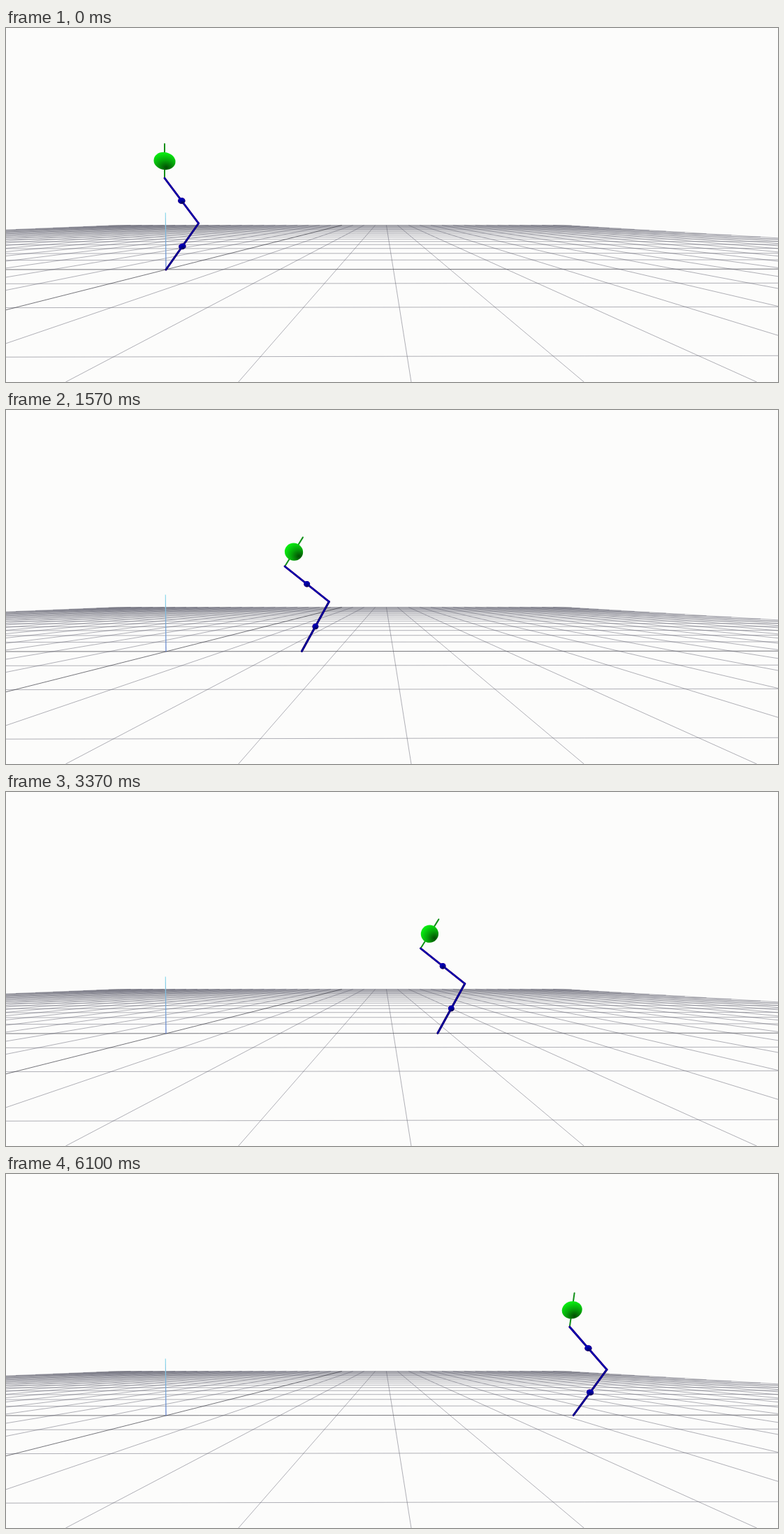
An HTML page with a canvas that plays this animation: 1105 px wide and 507 px high, repeating every 6130 ms.

```html
<!DOCTYPE html>
<html>
<head>
<meta charset="utf-8">
<title>Hopping robot</title>
<style>
html, body { margin: 0; width: 100%; height: 100%; overflow: hidden; background: #fcfcfb; }
canvas { display: block; }
</style>
</head>
<body>
<canvas id="stage" width="1105" height="507"></canvas>
<script>
const W = 1105, H = 507, LOOP = 6130;
const ctx = document.getElementById('stage').getContext('2d');
const VX = 542, VY = 267;          // vanishing point of the floor
const FOCAL = 440, BONE = 81, TORSO = 49;
const HOP_TIME = 1800, HOP_LENGTH = 194.4, START_X = 229;

// Poses of one hop: time, hip x, hip y, torso tilt, blue foot x, y, red foot x, y
const STAND = [0, -2, 215, 0, 0, 346, 0, 346];
const HOP = [
  [570, 0, 206, 59, 83, 345.5, 83, 345.5],
  [730, 42, 180, 47, 180, 269, 74, 279],
  [1050, 98, 112, 18, 204, 240, 150, 255],
  [1330, 150, 223, 60, 194, 345.5, 194, 345.5],
  [1440, 160, 230, 48, 194, 345.5, 194, 345.5],
  [1570, 170, 224, 32, 194.4, 345.5, 194.4, 345.5],
  [1900, 189, 219, 8, 194.4, 345.5, 194.4, 345.5]
];
const keys = [STAND];
for (let n = 0; n < 3; n++)
  for (const k of HOP)
    keys.push(k.map((v, i) =>
      i === 0 ? v + n * HOP_TIME : [1, 4, 6].includes(i) ? v + n * HOP_LENGTH : v));

const slope = (i, c) => (keys[i + 1][c] - keys[i][c]) / (keys[i + 1][0] - keys[i][0]);

function tangent(i, c) {
  if (i === 0 || i === keys.length - 1) return 0;
  const a = slope(i - 1, c), b = slope(i, c);
  return a * b > 0 ? 2 * a * b / (a + b) : 0;
}

function poseAt(t) {
  const last = keys.length - 1;
  if (t >= keys[last][0]) return keys[last];
  let i = 0;
  while (keys[i + 1][0] <= t) i++;
  const a = keys[i], b = keys[i + 1], d = b[0] - a[0], s = (t - a[0]) / d;
  const ease = s * s * (3 - 2 * s);
  return a.map((v, c) => v + (b[c] - v) * ease
    + d * s * (1 - s) * ((1 - s) * tangent(i, c) - s * tangent(i, c + 0 && c) * 0)
    - d * s * s * (1 - s) * tangent(i + 1, c));
}

function line(x1, y1, x2, y2, color, width) {
  ctx.strokeStyle = color;
  ctx.lineWidth = width;
  ctx.beginPath();
  ctx.moveTo(x1, y1);
  ctx.lineTo(x2, y2);
  ctx.stroke();
}

function drawFloor() {
  const thin = 'rgba(85,85,100,.58)', dark = 'rgba(40,40,50,.8)';
  const rowY = k => VY + 384.4 / (1.891 + k);
  const colX = (n, y) => VX + (38 + 247.3 * n) * (y - VY) / 240;
  const top = rowY(23);
  for (let k = 0; k <= 23; k++) {
    const y = rowY(k);
    const tilt = x => y - (y - VY) * (x - W / 2) * 9e-6;
    const x1 = Math.max(0, colX(-24, y)), x2 = Math.min(W, colX(16, y));
    line(x1, tilt(x1), x2, tilt(x2), k === 3 ? dark : thin, 0.8);
  }
  for (let n = -24; n <= 16; n++)
    line(colX(n, top), top, colX(n, H), H, n === -4 ? dark : thin, 0.8);
  const axis = ctx.createLinearGradient(0, 264, 0, 346);
  axis.addColorStop(0, '#8fdcec');
  axis.addColorStop(1, '#5a78c8');
  line(228.3, 264.5, 229, 346, axis, 1.2);
}

// A ball, widened away from the middle of the view as by a wide lens
function ball(x, y, r, [light, mid, dark], shadow) {
  const dx = x - W / 2, dy = y - H / 2;
  const stretch = Math.hypot(1, Math.hypot(dx, dy) / FOCAL), turn = Math.atan2(dy, dx);
  ctx.save();
  ctx.translate(x, y);
  ctx.rotate(turn);
  ctx.scale(stretch, 1);
  ctx.rotate(-turn);
  const sx = Math.cos(shadow) * r * 0.75, sy = Math.sin(shadow) * r * 0.75;
  const g = ctx.createRadialGradient(sx, sy, 0, sx, sy, r * 1.65);
  g.addColorStop(0, dark);
  g.addColorStop(0.5, mid);
  g.addColorStop(1, light);
  ctx.fillStyle = g;
  ctx.beginPath();
  ctx.arc(0, 0, r, 0, 2 * Math.PI);
  ctx.fill();
  ctx.restore();
}

function leg(hx, hy, fx, fy, thigh, shank, shades) {
  const dx = fx - hx, dy = fy - hy, d = Math.hypot(dx, dy);
  const bend = Math.sqrt(Math.max(0, BONE * BONE - d * d / 4));
  const kx = (hx + fx) / 2 + dy / d * bend, ky = (hy + fy) / 2 - dx / d * bend;
  line(kx, ky, fx, fy, shank, 2.8);
  line(hx, hy, kx, ky, thigh, 2.8);
  ball((hx + kx) / 2, (hy + ky) / 2, 4.3, shades, 1.2);
  ball((kx + fx) / 2, (ky + fy) / 2, 4.3, shades, 1.2);
}

function drawRobot(t) {
  const [, x, hy, deg, bx, by, rx, ry] = poseAt(t);
  const hx = START_X + x, tilt = deg * Math.PI / 180;
  const tx = Math.sin(tilt) * TORSO, ty = -Math.cos(tilt) * TORSO;
  line(hx, hy, hx + tx, hy + ty, '#109018', 2);
  leg(hx, hy, START_X + rx, ry, '#c00c0c', '#8c0c0c', ['#c81414', '#a00c0c', '#600000']);
  leg(hx, hy, START_X + bx, by, '#0000ac', '#000096', ['#0000c0', '#00009c', '#000058']);
  ball(hx + tx / 2, hy + ty / 2, 12.5, ['#08ec10', '#06a40a', '#034c04'], 1.4 - 1.2 * tilt);
}

function frame() {
  ctx.clearRect(0, 0, W, H);
  ctx.lineCap = 'butt';
  drawFloor();
  ctx.lineCap = 'round';
  drawRobot(performance.now() % LOOP);
  requestAnimationFrame(frame);
}
frame();
</script>
</body>
</html>
```
